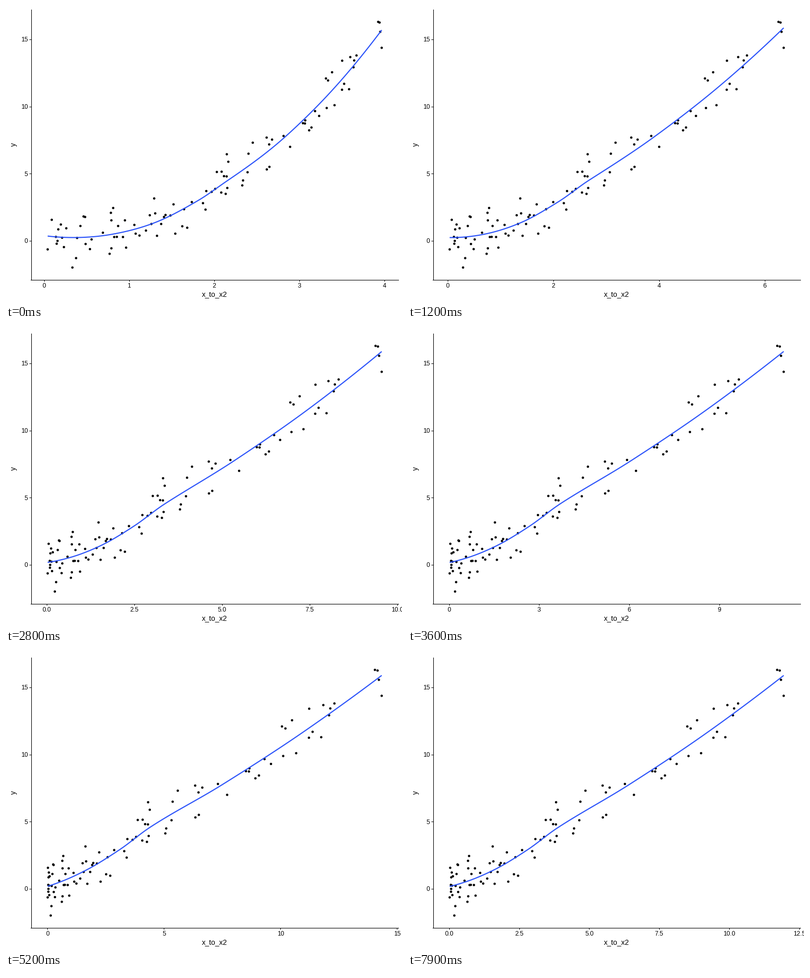
A matplotlib script that plays this animation: 768x576 px, repeating every 8 s.

```python
import math

import matplotlib.pyplot as plt
import numpy as np
from matplotlib.animation import FuncAnimation
from matplotlib.collections import LineCollection

WIDTH, HEIGHT, DPI = 768, 576, 72
LEFT, RIGHT, TOP, BOTTOM = 48.4, 761, 7, 532.8
FRAMES, INTERVAL, STEPS = 80, 100, 59
TICK = 3.5

plt.rcParams["font.family"] = "Liberation Sans"

X = np.array([
    .042, .09, .139, .148, .158, .167, .197, .212, .233, .261,
    .333, .376, .388, .427, .464, .482, .488, .539, .558, .691,
    .77, .785, .791, .791, .812, .824, .855, .87, .927, .95,
    .964, 1.061, 1.076, 1.121, 1.197, 1.242, 1.261, 1.294, 1.306, 1.327,
    1.376, 1.409, 1.427, 1.485, 1.521, 1.542, 1.624, 1.645, 1.682, 1.736,
    1.867, 1.897, 1.906, 1.969, 2.011, 2.03, 2.082, 2.086, 2.114, 2.134,
    2.145, 2.147, 2.153, 2.165, 2.329, 2.338, 2.391, 2.402, 2.452, 2.615,
    2.617, 2.645, 2.648, 2.679, 2.814, 2.891, 3.042, 3.065, 3.069, 3.115,
    3.142, 3.184, 3.232, 3.312, 3.321, 3.337, 3.384, 3.413, 3.501, 3.503,
    3.526, 3.584, 3.598, 3.636, 3.644, 3.671, 3.926, 3.942, 3.95, 3.967])
Y = np.array([
    -.63, 1.57, .3, -.21, 0, .86, 1.22, .24, -.46, .94,
    -1.98, -1.28, .22, 1.11, 1.82, 1.78, -.23, -.61, .11, .61,
    -.96, 2.09, 1.53, -.55, 2.45, .29, .3, 1.11, .29, 1.53,
    -.5, 1.19, .54, .4, .77, 1.91, 1.26, 3.16, 2.05, .38,
    1.26, 1.78, 1.93, 1.89, 2.72, .54, 1.09, 2.36, .98, 2.89,
    2.81, 2.33, 3.71, 3.65, 3.87, 5.13, 3.6, 5.15, 4.82, 3.5,
    4.8, 6.45, 3.94, 5.89, 4.13, 4.5, 5.11, 6.49, 7.31, 7.69,
    5.32, 7.18, 5.51, 7.54, 7.81, 7, 8.76, 8.74, 8.97, 8.23,
    8.44, 9.66, 9.3, 12.09, 9.89, 11.94, 12.55, 10.1, 11.25, 13.41,
    11.69, 11.29, 13.68, 12.92, 13.43, 13.8, 16.3, 16.25, 15.56, 14.37])


def expand(values):
    lo, hi = values.min(), values.max()
    pad = .05 * (hi - lo)
    return lo - pad, hi + pad


def nice_breaks(lo, hi, m=5):
    """Extended Wilkinson tick search."""
    steps = [1, 5, 2, 2.5, 4, 3]
    span = hi - lo
    best, found = -2, []
    j = 1
    while True:
        for i, q in enumerate(steps):
            simple_max = 2 - i / 5 - j
            if .25 * simple_max + .75 < best:
                return [b for b in found if lo <= b <= hi]
            k = 2
            while True:
                dense_max = 2 - (k - 1) / (m - 1) if k >= m else 1
                if .25 * simple_max + .25 + .5 * dense_max < best:
                    break
                z = math.ceil(math.log10(span / (k + 1) / j / q))
                while True:
                    step = j * q * 10.0 ** z
                    extra = max(step * (k - 1) - span, 0) / 2
                    cover_max = 1 - (extra / (.1 * span)) ** 2
                    if .25 * simple_max + .2 * cover_max + .5 * dense_max + .05 < best:
                        break
                    first = math.floor(hi / step) * j - (k - 1) * j
                    last = math.ceil(lo / step) * j
                    for start in range(first, last + 1):
                        a = start * step / j
                        b = a + step * (k - 1)
                        has_zero = start % j == 0 and a <= 0 <= b
                        simple = 1 - i / 5 - j + has_zero
                        cover = 1 - .5 * ((hi - b) ** 2 + (lo - a) ** 2) / (.1 * span) ** 2
                        ratio = (k - 1) / (b - a) * (max(b, hi) - min(a, lo)) / (m - 1)
                        dense = 2 - max(ratio, 1 / ratio)
                        score = .25 * simple + .2 * cover + .5 * dense + .05
                        if score > best:
                            best = score
                            found = [a + n * step for n in range(k)]
                    z += 1
                k += 1
        j += 1


def cell_cuts(x, limit=15):
    if len(x) <= limit:
        return []
    m = (len(x) + 1) // 2
    return cell_cuts(x[:m]) + [(x[m - 1] + x[m]) / 2] + cell_cuts(x[m:])


def local_fit(x, y, at, span=.75):
    """Value and slope of the tricube-weighted local parabola."""
    d = np.abs(x - at)
    reach = np.sort(d)[int(len(x) * span) - 1]
    root_w = np.sqrt(np.clip(1 - (d / reach) ** 3, 0, None) ** 3)
    basis = np.vander(x - at, 3, increasing=True)
    coef = np.linalg.lstsq(basis * root_w[:, None], y * root_w, rcond=None)[0]
    return coef[:2]


def loess(x, y, at):
    margin = .005 * (x[-1] - x[0])
    knots = np.array([x[0] - margin] + cell_cuts(x) + [x[-1] + margin])
    value, slope = np.array([local_fit(x, y, k) for k in knots]).T
    i = np.clip(np.searchsorted(knots, at) - 1, 0, len(knots) - 2)
    h = knots[i + 1] - knots[i]
    t = (at - knots[i]) / h
    return ((1 + 2 * t) * (1 - t) ** 2 * value[i] + t * (1 - t) ** 2 * h * slope[i]
            + t * t * (3 - 2 * t) * value[i + 1] - t * t * (1 - t) * h * slope[i + 1])


def to_px(v, limits):
    return LEFT + (v - limits[0]) / (limits[1] - limits[0]) * (RIGHT - LEFT)


Y_LIMITS = expand(Y)


def to_py(v):
    return BOTTOM - (v - Y_LIMITS[0]) / (Y_LIMITS[1] - Y_LIMITS[0]) * (BOTTOM - TOP)


fig = plt.figure(figsize=(WIDTH / DPI, HEIGHT / DPI), dpi=DPI, facecolor="white")
ax = fig.add_axes([0, 0, 1, 1])
ax.set_xlim(0, WIDTH)
ax.set_ylim(HEIGHT, 0)
ax.axis("off")

dots = ax.scatter(X, Y, s=4.6 ** 2, c=["black"] * len(X), linewidths=0, zorder=2)
curve, = ax.plot([], [], color="#2a52fa", lw=2.13, solid_capstyle="butt",
                 solid_joinstyle="round", zorder=3)
ax.plot([48.5, 48.5], [TOP, 533], color="black", lw=1.07, zorder=4)
ax.plot([48, RIGHT], [532.5, 532.5], color="black", lw=1.07, zorder=4)

for level in nice_breaks(*Y_LIMITS):
    py = to_py(level)
    ax.plot([48.5 - TICK, 48.5], [py, py], color="black", lw=1.07,
            solid_capstyle="butt")
    ax.text(42.2, py + 4.3, f"{level:g}", size=12, ha="right", va="baseline")

ax.text((LEFT + RIGHT) / 2, 565, "x_to_x2", size=14, ha="center", va="baseline")
ax.text(19, (TOP + BOTTOM) / 2, "y", size=14, rotation=90, rotation_mode="anchor",
        ha="center", va="baseline")

x_ticks = ax.add_collection(LineCollection([], colors="black", linewidths=1.07))
x_labels = [ax.text(0, 548, "", size=12, ha="center", va="baseline")
            for _ in range(10)]


def update(frame):
    # One state is held for two frames at the turning point.
    step = frame if frame <= STEPS else 2 * STEPS + 1 - frame
    w = step / STEPS
    x = (1 - w) * X + w * X ** 2
    limits = expand(x)

    dots.set_offsets(np.column_stack([to_px(x, limits), to_py(Y)]))
    grid = np.linspace(x[0], x[-1], 80)
    curve.set_data(to_px(grid, limits), to_py(loess(x, Y, grid)))

    breaks = nice_breaks(*limits)
    places = [to_px(b, limits) for b in breaks]
    x_ticks.set_segments([[(p, 532.5), (p, 532.5 + TICK)] for p in places])
    digits = 0 if all(abs(b - round(b)) < 1e-6 for b in breaks) else 1
    for label in x_labels:
        label.set_text("")
    for label, p, b in zip(x_labels, places, breaks):
        label.set_x(p)
        label.set_text(f"{b:.{digits}f}")
    return [dots, curve, x_ticks, *x_labels]


animation = FuncAnimation(fig, update, frames=FRAMES, interval=INTERVAL,
                          repeat=True, repeat_delay=0)
plt.show()
```
